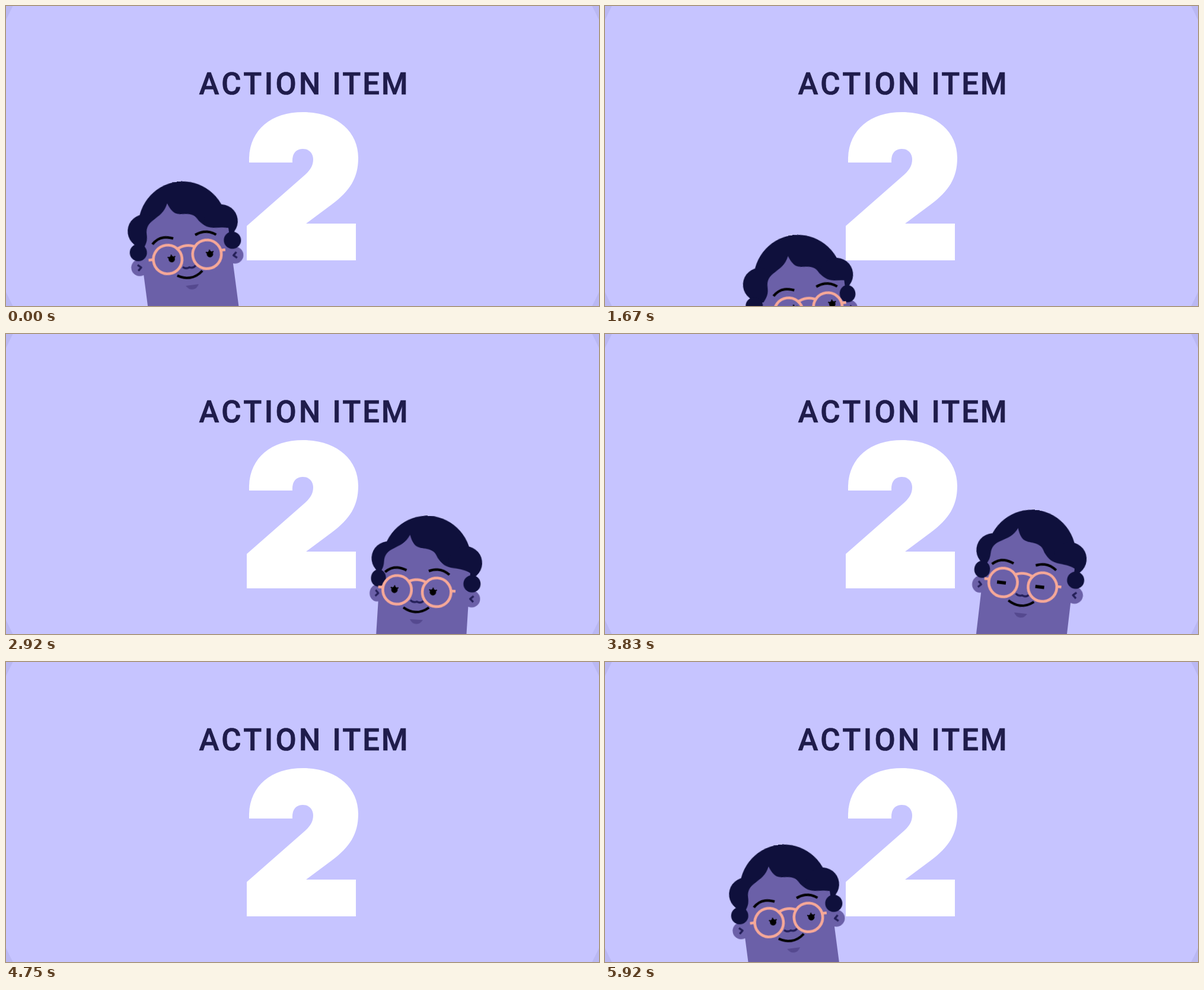
Write an HTML page without scripts that moves like this. It is 1000 by 506 pixels and loops after 6010 ms.

```html
<!DOCTYPE html>
<html lang="en">
<head>
<meta charset="utf-8">
<title>Action item 2</title>
<style>
  @property --turn { syntax: "<number>"; inherits: true; initial-value: 0; }

  html, body { margin: 0; height: 100%; overflow: hidden; background: #c6c4ff; }
  svg { display: block; width: 100%; height: 100%; }
  text { font: 500 51px Roboto, sans-serif; letter-spacing: 4.4px; fill: #1f1c4b; stroke: #1f1c4b; stroke-width: .7; }
  .tight { letter-spacing: 3px; }

  .skin { fill: #6b60a8; }
  .hair { fill: #0f103c; }
  .line { fill: none; stroke-linejoin: round; }
  .mark { stroke: #241f58; stroke-width: 3.4; }
  .ink { stroke: #000; stroke-width: 4.2; }
  .rim { stroke: #f6a898; stroke-width: 4.6; }

  /* 72 held poses per loop; one pose is 1.389% */
  .head, .gaze, .open, .shut, .brows, .smile { animation: 6010ms -15ms step-end infinite; }
  .head { animation-name: hop, turn; }
  .gaze { animation-name: gaze; }
  .open { animation-name: open; }
  .shut { animation-name: shut; }
  .brows { animation-name: brows; }
  .smile { animation-name: smile; }

  /* face slides with the turn, the back of the head against it;
     the side turned away gets narrower */
  .face { transform: translateX(calc(var(--turn) * 1px)); }
  .brow-line { transform: translateX(max(var(--turn) * 1px, var(--turn) * .65px)); }
  .back { transform: translateX(calc(var(--turn) * -.12px)); }
  .left { transform-origin: -65px 0; transform: scaleX(calc(1 + min(0, var(--turn)) * .01)); }
  .right { transform-origin: 65px 0; transform: scaleX(calc(1 - max(0, var(--turn)) * .01)); }

  @keyframes hop {
    0%, 100% { transform: translate(302.5px, 405.5px) rotate(-7.5deg); }
    /* drop out on the left */
    23.611% { transform: translate(303px, 407.5px) rotate(-7.5deg); }
    25% { transform: translate(305px, 414.5px) rotate(-7.5deg); }
    26.389% { transform: translate(312.5px, 437.5px) rotate(-7.5deg); }
    27.778% { transform: translate(331px, 495.5px) rotate(-7.5deg); }
    29.167% { transform: translate(358px, 580px) rotate(-7.5deg); }
    30.556% { transform: translate(400px, 750px) rotate(-7.5deg); }
    /* rise on the right, tilting over */
    44.444% { transform: translate(686px, 550px) rotate(2deg); }
    45.833% { transform: translate(688px, 470px) rotate(2.5deg); }
    47.222% { transform: translate(698px, 432px) rotate(3deg); }
    48.611% { transform: translate(706px, 416.4px) rotate(3.6deg); }
    50% { transform: translate(709.5px, 410.5px) rotate(4.6deg); }
    51.389% { transform: translate(712px, 408px) rotate(5.4deg); }
    52.778% { transform: translate(713.7px, 406.7px) rotate(6.2deg); }
    54.167% { transform: translate(714.2px, 406px) rotate(6.7deg); }
    /* drop out on the right */
    72.222% { transform: translate(714.1px, 407px) rotate(6.7deg); }
    73.611% { transform: translate(714px, 410px) rotate(6.7deg); }
    75% { transform: translate(713px, 418px) rotate(6.7deg); }
    76.389% { transform: translate(711.5px, 434px) rotate(6.7deg); }
    77.778% { transform: translate(700.5px, 506px) rotate(6.7deg); }
    79.167% { transform: translate(690px, 750px) rotate(6.7deg); }
    /* rise on the left */
    94.444% { transform: translate(344px, 540px) rotate(-7.5deg); }
    95.833% { transform: translate(322px, 466px) rotate(-7.5deg); }
    97.222% { transform: translate(311px, 433px) rotate(-7.5deg); }
    98.611% { transform: translate(306.5px, 417.5px) rotate(-7.5deg); }
  }
  @keyframes turn {
    0%, 80.556%, 100% { --turn: 0; }
    1.389% { --turn: 0; animation-timing-function: steps(2, start); }
    4.167% { --turn: 1.2; animation-timing-function: steps(4, start); }
    9.722% { --turn: 7; animation-timing-function: steps(2, start); }
    12.5% { --turn: 8.4; }
    33.333% { --turn: -13; }
    55.556% { --turn: -13; animation-timing-function: steps(8, start); }
    66.667% { --turn: -8; }
  }
  @keyframes gaze {
    0%, 80.556%, 100% { transform: translate(6.9px, 18.3px); }
    1.389% { transform: translate(6.9px, 18.3px); animation-timing-function: steps(8, start); }
    12.5% { transform: translate(10px, 14px); }
    33.333% { transform: translate(-4.4px, 18.2px); }
    55.556% { transform: translate(-4.4px, 18.2px); animation-timing-function: steps(8, start); }
    66.667% { transform: translate(-2.4px, 18.4px); }
  }
  @keyframes open {
    0%, 19.444%, 65.278%, 100% { opacity: 1; }
    15.278%, 61.111% { opacity: 0; }
  }
  @keyframes shut {
    0%, 19.444%, 65.278%, 100% { opacity: 0; }
    15.278%, 61.111% { opacity: 1; }
  }
  @keyframes brows {
    0%, 33.333%, 100% { transform: translate(0, 0); }
    12.5% { transform: translate(0, 0); animation-timing-function: steps(8, start); }
    23.611% { transform: translate(.6px, -1.5px); }
  }
  @keyframes smile {
    0%, 33.333%, 100% { transform: translate(0, 0) scale(1, 1); }
    12.5% { transform: translate(0, 0) scale(1, 1); animation-timing-function: steps(8, start); }
    23.611% { transform: translate(1px, 2.5px) scale(.73, 1); }
  }
</style>
</head>
<body>
<svg viewBox="0 0 1000 506">
  <defs>
    <clipPath id="skull"><rect x="-76" y="-100" width="152" height="140"/></clipPath>
    <g id="eye">
      <circle r="5.4"/>
      <path class="line" d="M0 0L-6.4-4.2M0 0V-7.4M0 0L6.4-4.2" stroke="#000" stroke-width="2.2"/>
    </g>
  </defs>

  <rect width="1000" height="506" fill="#bab8f3"/>
  <circle cx="500" cy="253" r="550" fill="#c6c4ff"/>

  <text x="325.5" y="148.5">ACTION</text>
  <text class="tight" x="550.5" y="148.5">ITEM</text>
  <path role="img" aria-label="2" fill="#fff" d="M410 264C408 212 444 179 501 179C557 179 594 211 594 256C594 290 580 312 549 335L506 367H590V429H406V371L504 285C513 277 518 269 518 259C518 248 511 241 500.5 241C489 241 482 249 483 264Z"/>

  <g class="head">
    <g class="back hair">
      <circle cy="-35.4" r="74.5"/>
      <circle cx="-65" cy="-34.3" r="28.4"/>
      <circle cx="65" cy="-34.3" r="28.4"/>
    </g>
    <circle class="left skin" cx="-81" cy="25.5" r="14.3"/>
    <circle class="right skin" cx="81" cy="25.5" r="14.3"/>
    <rect class="skin" x="-76" y="-4" width="152" height="260"/>
    <g clip-path="url(#skull)">
      <path class="brow-line skin" d="M-21-76C-27-62-38-57-46-52C-57-46-62-40-62-28C-62-18-65-12-72-4L-90 30H90V-14C80-22 70-23.5 56-24.5C42-25.5 36-30 28-40C24-47 22-51 12-53.5C5-55.5-8-53-14-62Q-18-67-21-76Z"/>
    </g>
    <g class="left">
      <path class="line mark" d="M-84 20.5L-78.5 25.5L-84 30.5"/>
      <circle class="hair" cx="-80" r="14.5"/>
    </g>
    <g class="right">
      <path class="line mark" d="M84 20.5L78.5 25.5L84 30.5"/>
      <circle class="hair" cx="80" r="14.5"/>
    </g>

    <g class="face">
      <path d="M-8 66H14Q10 73.5 3 73.5Q-4 73.5-8 66Z" fill="#55498f"/>
      <path class="line mark" d="M-9 34q5 4.5 11 1.8q6 3.2 11-1.8"/>
      <path class="smile line ink" d="M-20 47Q3 61 23 44.5"/>
      <path class="brows line ink" d="M-54.6-10.7Q-40-25.5-18.6-16M54-12.8Q38-25.5 18.9-17"/>
      <g class="gaze">
        <g class="open">
          <use href="#eye" x="-32.5"/>
          <use href="#eye" x="32.5"/>
        </g>
        <path class="shut" d="M-40-2.8h15v5.6h-15zM25-2.8h15v5.6h-15z"/>
      </g>
      <g class="line rim">
        <circle cx="-32.4" cy="17.9" r="24.2"/>
        <circle cx="34.4" cy="17.9" r="24.2"/>
        <path d="M-15.5 3.5Q1-6 17.5 3.5M-57 15H-64.5M59 14.3H66"/>
      </g>
    </g>
  </g>
</svg>
</body>
</html>
```
